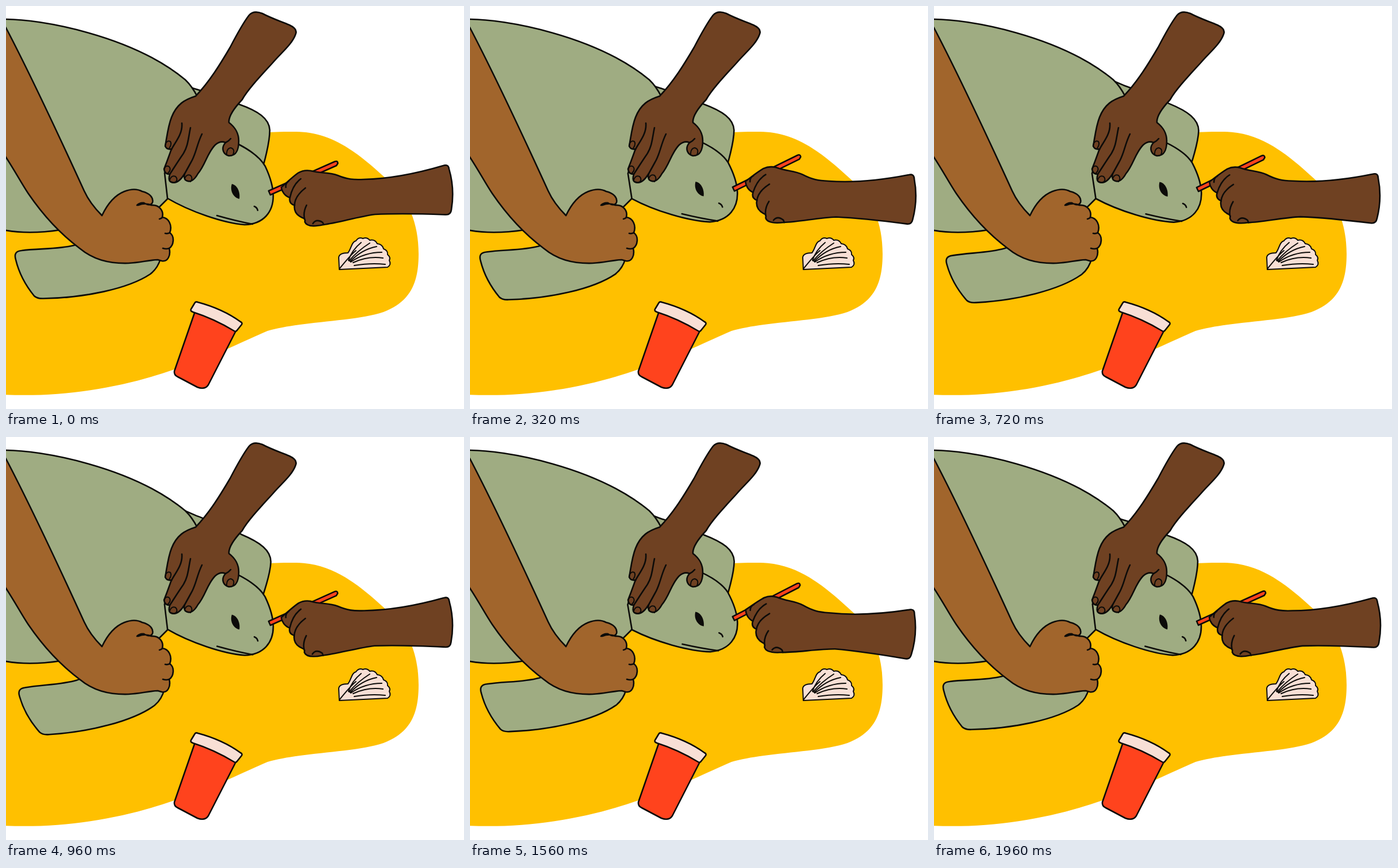
An HTML page for the animation above (2 s loop, 797 px wide and 702 px high).

```html
<!DOCTYPE html>
<html lang="en">
<head>
<meta charset="utf-8">
<title>Turtle rescue</title>
<style>
  html, body { margin: 0; width: 100%; height: 100%; overflow: hidden; background: #fff; }
  svg { display: block; width: 100vw; height: 100vh; }
  .line { stroke: #0c0b09; stroke-width: 2.6; stroke-linejoin: round; stroke-linecap: round; fill: none; }
  .green { fill: #9fac82; }
  .dark { fill: #6f4122; }
  .light { fill: #a1652c; }
  .red { fill: #ff431d; }
  .pink { fill: #f8dfd5; }
  .thin { stroke-width: 2; }
</style>
</head>
<body>
<svg viewBox="0 0 797 702">
  <path fill="#ffc000" d="M-5 300L400 230C425 221 455 219 500 219C566 218 612 255 665 304C700 335 718 378 718 432C718 484 703 515 657 533C607 550 512 549 455 566C415 583 370 607 290 634C200 665 100 682 -5 677Z"/>

  <g id="frontFlipper">
    <path class="line green" d="M150 408L118 417C90 424 58 422 27 426C17 427 14 432 17 442C23 467 36 489 49 505Q54 510 65 509.5C135 508.5 212 493 251 467Q264 457 269 440Z"/>
  </g>
  <g id="backFlipper">
    <path class="line green" d="M290 130L325 143C350 151 382 160 405 171C439 183 458 196 459 216C459 233 454 255 448 277L420 300L330 230Z"/>
  </g>
  <path class="line green" d="M-5 23C60 22 220 52 312 128.500Q324 140 333 158C325 200 300 280 282 335L268 349C235 375 150 377 95 390C55 396 20 395 -5 390Z"/>

  <g id="head">
    <path class="line green" d="M281 335L276 291L292 250L340 222L382 231L405 241C428 253 443 265 451 279C459 296 465 316 465 331C465 358 449 380 415 381C378 378 320 358 281 335Z"/>
    <path d="M393 310C403 312 408 325 406 336C396 334 389 322 393 310Z" fill="#0c0b09"/>
    <path class="line" d="M367 365C388 371 408 376 429 380M432 349Q437 351 438 356"/>
    <path class="line red" d="M457 322L572 271Q577 269 577.500 274L575 278L460 329Z"/>
  </g>

  <g id="strawHand">
    <path class="line dark" d="M479 316C487 309 497 299 508 291Q518 285 530 287C548 292 562 289 577 295C594 302 605 303 623 302C670 301 717 291 761 278Q770 275 771 284C778 308 779 331 775 355Q774 363.500 766 363.500C724 362 682 361 642 363C612 367 577 378 552 381Q524 387 520 376C521 372 520 370 516 369C504 364 501 356 502 347C494 345 493 339 494 334C485 331 480 323 479 316Z"/>
    <path class="line" d="M513 301C502 309 497 320 494 334M521 317C508 327 502 337 502 348M523 347C519 355 517 363 520 373M534 379Q540 370 551 377L553 381M492 305Q486 309 487 316"/>
  </g>

  <path class="line dark" d="M330 157C354 132 373 101 390 72C403 47 413 29 423 16Q431 7 446 13C463 22 479 27 493 33Q508 40 504 49C498 67 477 83 464 99C444 121 421 145 411 163C395 180 387 193 388 203C397 210 405 219 405 235C405 251 401 261 388 261C377 258 374 247 382 238Q373 234 364 242C350 256 347 277 334 292C328 303 320 309 312 303Q309 299 311 292C303 305 295 311 286 306Q282 303 285 293Q276 293 275 284L280 271L288 249Q280 251 277 244C280 228 282 209 288 194C297 171 311 163 330 157Z"/>
  <path class="line" d="M306 204C308 224 292 240 288 250M321 212C317 231 317 244 308 258C299 271 291 284 285 293M341 223C332 241 331 257 322 272L311 292M382 238Q388 235 391 231"/>
  <path class="line thin" d="M277 242Q280 233 286 236Q289 241 284 248M275 285Q278 276 284 280Q288 285 282 291M285 303Q288 294 295 297Q300 302 295 307M311 301Q314 292 321 295Q326 300 321 306M384 258Q384 248 391 247Q399 249 395 259"/>

  <path class="line light" d="M-5 31L0 38C48 130 94 230 136 322Q146 344 167 365C176 346 188 330 206 323Q224 316 237 323C250 326 257 334 255 342Q251 350 240 343L230 347Q243 342 253 347C266 346 275 356 272 368C283 369 290 382 285 395C294 401 292 417 284 422C287 434 282 446 271 444L264 442C245 443 235 447 213 448C177 449 151 441 128 422C96 398 67 368 39 327C25 306 14 284 -5 256Z"/>
  <path class="line" d="M228 347Q233 342 240 343M272 368Q271 370 267 371M285 395Q281 397 277 396M284 422Q279 424 273 422"/>

  <path class="line red" d="M329 532L293 636Q292 643 299 646L333 664Q346 669 352 660L400 566Q370 545 329 532Z"/>
  <path class="line pink" d="M328 518Q330 514 334 516C360 523 386 534 408 550Q412 552 410 555L402 565Q400 568 397 566C374 552 350 541 325 533Q320 531 322 528Z"/>

  <path class="line thin pink" d="M580 459L579 438Q580 430 595 430C601 423 601 411 609 409Q614 402 621 405Q628 402 633 408Q642 406 646 414Q655 415 657 423Q665 426 664 433Q670 438 667 443Q671 451 664 455Z"/>
  <path class="line thin" d="M580 458C590 446 599 434 609 426M596 443Q602 425 618 412M597 444Q611 427 633 413M599 445Q619 424 645 419M600 446Q624 429 654 429M604 447Q630 435 656 439M606 452Q635 447 660 450"/>
</svg>
<script>
  const LOOP = 2000, STEP = 40;
  const part = id => document.getElementById(id);
  const rotate = (id, degrees, x, y) =>
    part(id).setAttribute('transform', `rotate(${degrees} ${x} ${y})`);

  function draw(ms) {
    const t = Math.floor((ms % LOOP) / STEP) * STEP / 1000;
    const sway = (1 - Math.cos(Math.PI * t)) / 2;
    // two tugs per loop, the second one stronger
    const tug = Math.abs(Math.sin(Math.PI * t)) * (t < 1 ? 0.82 : 1);
    rotate('frontFlipper', -2.6 * sway, 262, 295);
    rotate('backFlipper', 3.3 * sway, 430, 250);
    rotate('head', -3.3 * tug, 295, 320);
    rotate('strawHand', 7.8 * tug, 592, 314);
  }

  const start = performance.now();
  function tick() {
    draw(performance.now() - start);
    requestAnimationFrame(tick);
  }
  draw(0);
  requestAnimationFrame(tick);
</script>
</body>
</html>
```
